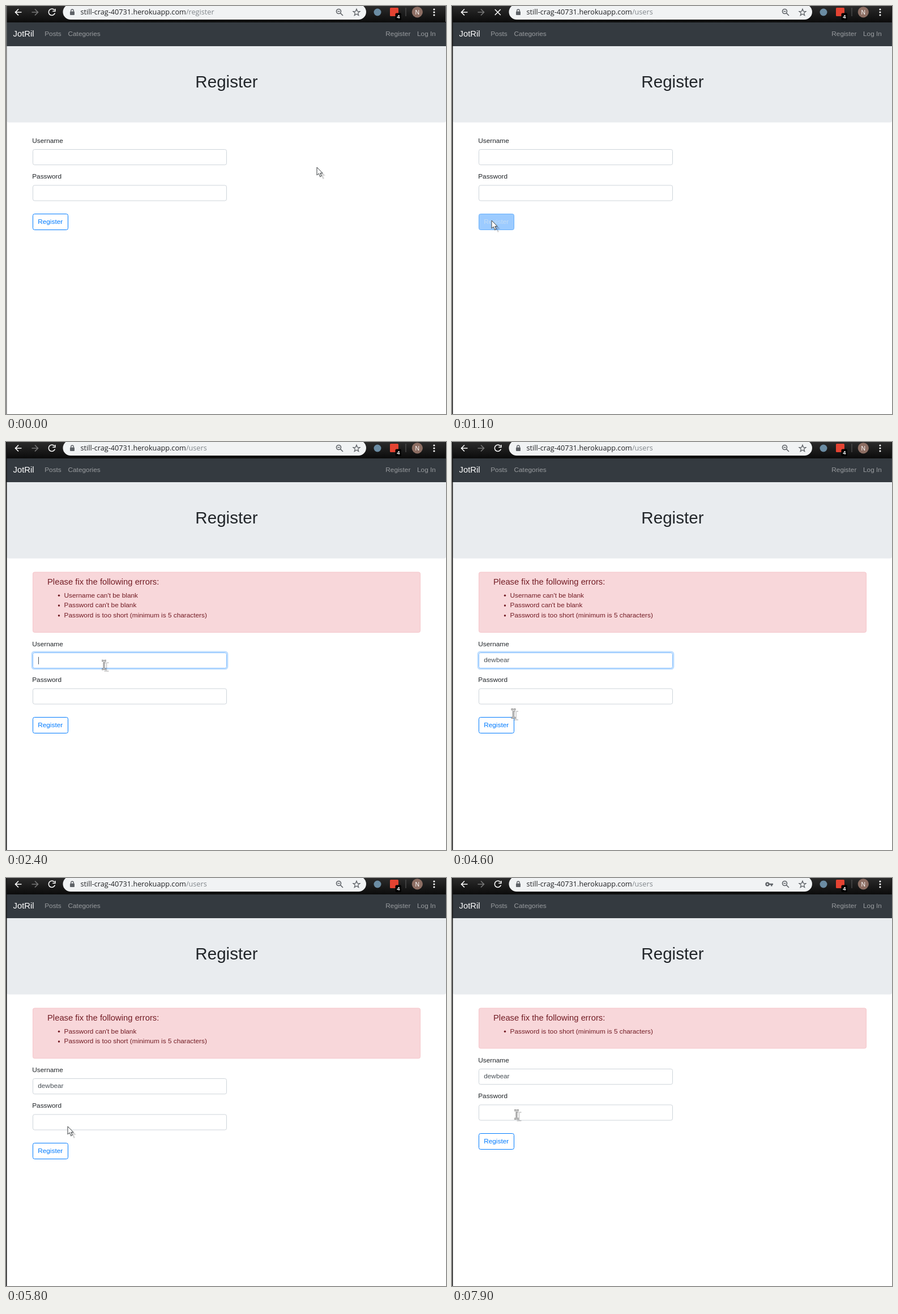
These frames come from a looping animation (777 by 721 pixels, 8 s). An HTML page:

```html
<!DOCTYPE html>
<html lang="en">
<head>
<meta charset="utf-8">
<title>Register</title>
<style>
  html, body { margin: 0; width: 100%; height: 100%; overflow: hidden; background: #fff; }
  svg { display: block; width: 100vw; height: 100vh; }
  text { font: 11.84px "Liberation Sans", Arial, sans-serif; fill: #212529; white-space: pre; }
  .url { font: 12.7px "Open Sans", "Noto Sans", sans-serif; fill: #202124; }
  .nav { fill: #999c9f; }
  .brand { font-size: 14.8px; fill: #fff; }
  .h1 { font-size: 29.6px; }
  .alert text { fill: #721c24; }
  .alert .title { font-size: 14.8px; }
  .value { fill: #495057; }
  .line { fill: none; stroke-width: 1.6; }
  .thin { fill: none; stroke-width: 1.3; }
  .box { fill: #fff; }
  .ring { fill: none; stroke: #bfdeff; stroke-width: 2.4; }
  .badge { font-size: 9.5px; font-weight: bold; fill: #fff; }
  .initial { font-size: 10.5px; fill: #fff; }
</style>
</head>
<body>
<svg viewBox="0 0 777 721">
  <defs>
    <linearGradient id="bar" x2="0" y2="1">
      <stop stop-color="#2b2b2b"/><stop offset="1" stop-color="#0b0b0b"/>
    </linearGradient>
    <path id="arrow" d="M0 0V14L3.2 11L5.6 16.6L8 15.5L5.7 10.3H10Z"/>
    <path id="beam" d="M-4-7.5H-1.5L0-6.5L1.5-7.5H4M-4 7.5H-1.5L0 6.5L1.5 7.5H4M0-6.5V6.5"/>
  </defs>
  <rect width="777" height="721" fill="#fff"/>

  <!-- page header -->
  <rect x="1.5" y="60" width="775.5" height="145.7" rx="3.5" fill="#e9ecef"/>
  <rect y="28" width="777" height="43" fill="#343a40"/>
  <text class="brand" x="12.5" y="53.7">JotRil</text>
  <text class="nav" x="68.2" y="53">Posts</text>
  <text class="nav" x="109.5" y="53">Categories</text>
  <text class="nav" x="670.3" y="53">Register</text>
  <text class="nav" x="726" y="53">Log In</text>
  <text class="h1" x="334.3" y="144">Register</text>

  <!-- browser bar -->
  <rect width="777" height="29" fill="url(#bar)"/>
  <rect x="100.5" y="-3" width="535.5" height="27" rx="13.5" fill="#f1f3f4"/>
  <g class="line" stroke="#fff">
    <path d="M27.5 11H16.500M22 5.500L16.500 11L22 16.500"/>
    <path d="M45.500 11H56.500M51 5.500L56.500 11L51 16.500" stroke="#777"/>
    <path id="reload" d="M85.300 7A5.700 5.700 0 1 0 86.400 12.500M86.800 5V9.300H82.300"/>
    <path id="stop" d="M75.800 6L85.800 16M85.800 6L75.800 16"/>
  </g>
  <rect x="113" y="9.5" width="8" height="6.5" rx="1" fill="#5f6368"/>
  <path class="thin" stroke="#5f6368" d="M114.700 10V8.300a2.300 2.300 0 0 1 4.600 0V10"/>
  <text class="url" x="131.5" y="15">still-crag-40731.herokuapp.com<tspan id="path" fill="#80868b"></tspan></text>
  <g id="key" stroke="#5f6368" fill="none" stroke-width="2.4">
    <circle cx="557" cy="11" r="2.5"/><path d="M560 11H567M564.300 11V14.500"/>
  </g>
  <g class="line" stroke="#5f6368">
    <circle cx="587.5" cy="9.5" r="4"/>
    <path d="M590.500 12.500L595 17M585.500 9.500H589.500"/>
    <path id="star" class="thin"/>
  </g>
  <circle cx="656" cy="11" r="6.5" fill="#6b8ca3"/>
  <rect x="678" y="3" width="15" height="15" rx="1.5" fill="#e44332"/>
  <rect x="687.5" y="12.5" width="10.5" height="12.5" rx="2"/>
  <text class="badge" x="692.8" y="22.3" text-anchor="middle">4</text>
  <path d="M706 3V18" stroke="#5a5a5a"/>
  <circle cx="726.3" cy="10.8" r="9.6" fill="#8d6e63"/>
  <text class="initial" x="726.3" y="14.5" text-anchor="middle">N</text>
  <path d="M756 6v0m0 5v0m0 5v0" stroke="#fff" stroke-width="3.2" stroke-linecap="round"/>
  <path id="edge" d="M0 0H1.500V721H0ZM776 0H777V28H776Z"/>

  <!-- error list -->
  <g class="alert" id="alert">
    <rect id="panel" x="47.5" y="230" width="684" rx="3" fill="#f8d7da" stroke="#f5c6cb"/>
    <text class="title" x="73" y="251.8">Please fix the following errors:</text>
    <g id="rows"></g>
  </g>

  <g id="form">
    <g id="fields"></g>
    <rect id="button" x="47.5" y="367.5" width="62" height="28" rx="3"/>
    <text id="label" x="78.2" y="385.3" text-anchor="middle">Register</text>
    <path id="caret" stroke="#495057"/>
  </g>
  <g id="pointer"></g>
</svg>
<script>
const $ = id => document.getElementById(id);
const set = (el, attrs) => { for (const k in attrs) el.setAttribute(k, attrs[k]); };
const show = (el, on) => set(el, { visibility: on ? 'visible' : 'hidden' });

const LOOP = 8000, STEP = 100;
const ROW = 17.7;        // height of one error line
const FIELD_GAP = 63.4;  // from one form field to the next
const NAME = 'dewbear';
const ERRORS = [
  "Username can't be blank",
  "Password can't be blank",
  "Password is too short (minimum is 5 characters)"
];

// each click on the button, and when the answer with its errors arrives
const submits = [
  { sent: 1100, loaded: 1300, errors: 3 },
  { sent: 5100, loaded: 5300, errors: 2 },
  { sent: 6900, loaded: 7500, errors: 1 }
];
// field, from, until
const focuses = [[0, 2300, 5100], [1, 6100, 6900]];
const MASK_TIME = 6500;

// leave, arrive, x, y, sag of the path
const HOME = [549, 285];
const glides = [
  [0, 1000, 70, 379, 80],
  [1800, 2300, 173, 394],
  [4500, 4600, 108.5, 480],
  [4600, 4900, 90, 496],
  [5000, 5100, 90, 505],
  [5400, 5800, 109, 439],
  [6000, 6100, 113, 432],
  [6500, 6900, 90, 488],
  [7000, 7900, 114, 418]
];

function pointerAt(t) {
  let [x, y] = HOME;
  for (const [leave, arrive, toX, toY, sag = 0] of glides) {
    if (t < leave) break;
    const u = Math.min(1, (t - leave) / (arrive - leave));
    const s = u * u * (3 - 2 * u);
    x += (toX - x) * s;
    y += (toY - y) * s + sag * Math.sin(Math.PI * s);
  }
  return [x, y];
}

const inside = ([x, y], left, top, width, height) =>
  x >= left && x <= left + width && y >= top && y <= top + height;

const fieldTop = i => 253.2 + FIELD_GAP * i;

$('fields').innerHTML = ['Username', 'Password'].map((name, i) => `
  <g transform="translate(0 ${fieldTop(i)})">
    <text x="46.200" y="-11.500">${name}</text>
    <rect class="ring" x="45.800" y="-1.400" width="345.400" height="30.200" rx="4"/>
    <rect class="box" x="47.500" y=".3" width="342" height="27.200" rx="3"/>
    <text class="value" x="56.200" y="17.200"></text>
  </g>`).join('');

const starPoints = Array.from({ length: 10 }, (_, i) => {
  const r = i % 2 ? 2.7 : 6.3, a = i * Math.PI / 5;
  return `${619 + r * Math.sin(a)} ${11.5 - r * Math.cos(a)}`;
});
set($('star'), { d: `M${starPoints.join('L')}Z` });

const rings = document.querySelectorAll('.ring');
const boxes = document.querySelectorAll('.box');
const values = document.querySelectorAll('.value');

function drawPointer([x, y], beam) {
  set($('pointer'), { transform: `translate(${x} ${y})` });
  $('pointer').innerHTML = beam
    ? `<g fill="none"><use href="#beam" x="4.500" y="3.500" stroke="#000" stroke-opacity=".18" stroke-width="2"/>
       <use href="#beam" stroke="#444" stroke-width="2.600"/><use href="#beam" stroke="#fff" stroke-width="1.100"/></g>`
    : `<use href="#arrow" x="5" y="4.500" fill="#000" fill-opacity=".17"/>
       <use href="#arrow" fill="#fff" stroke="#3a3f41"/>`;
}

function drawErrors(count) {
  show($('alert'), count > 0);
  set($('panel'), { height: 53.3 + ROW * count });
  $('rows').innerHTML = ERRORS.slice(ERRORS.length - count).map((msg, i) => `
    <g transform="translate(0 ${ROW * i})">
      <circle cx="93.500" cy="271.300" r="1.700" fill="#721c24"/>
      <text x="102.500" y="274.600">${msg}</text>
    </g>`).join('');
}

function drawButton(busy, hover) {
  const [fill, stroke, ink] = busy ? ['#9ccbff', '#68b0fb', '#c3dcf5']
    : hover ? ['#007bff', '#007bff', '#fff'] : ['#fff', '#007bff', '#007bff'];
  set($('button'), { fill, stroke });
  $('label').style.fill = ink;
}

function drawFields(t, masked) {
  const [field, since] = focuses.find(([, from, until]) => t >= from && t < until) || [-1, 0];
  values[0].textContent = NAME.slice(0, Math.max(0, Math.floor((t - 2920) / 140)));
  values[1].textContent = masked ? '•' : '';
  boxes.forEach((box, i) => {
    set(box, { stroke: i === field ? '#80bdff' : '#ced4da' });
    show(rings[i], i === field);
  });
  show($('caret'), field >= 0 && t < since + 500 && !masked);
  set($('caret'), { d: `M57.500 ${fieldTop(field) + 7.6}v13` });
}

let shown = -1;
function draw(now) {
  const t = Math.floor(now % LOOP / STEP) * STEP;
  const busy = submits.some(s => t >= s.sent && t < s.loaded);
  const sent = t >= submits[0].sent;
  const count = submits.findLast(s => t >= s.loaded)?.errors ?? 0;
  const shift = count && Math.round(65.9 + ROW * count);
  if (count !== shown) drawErrors(shown = count);
  set($('form'), { transform: `translate(0 ${shift})` });

  $('path').textContent = sent ? '/users' : '/register';
  set($('edge'), { fill: sent ? '#141414' : '#777' });
  show($('reload'), !busy);
  show($('stop'), busy);
  show($('key'), t >= MASK_TIME);

  const spot = pointerAt(t);
  const before = pointerAt(t - STEP); // the pointer's shape lags one step
  drawFields(t, t >= MASK_TIME && t < submits[2].loaded);
  drawButton(busy, inside(spot, 47, 367 + shift, 63, 29));
  drawPointer(spot, [0, 1].some(i => inside(before, 47, fieldTop(i) + shift, 343, 28)));
}

function tick() {
  draw(performance.now());
  requestAnimationFrame(tick);
}
tick();
</script>
</body>
</html>
```
